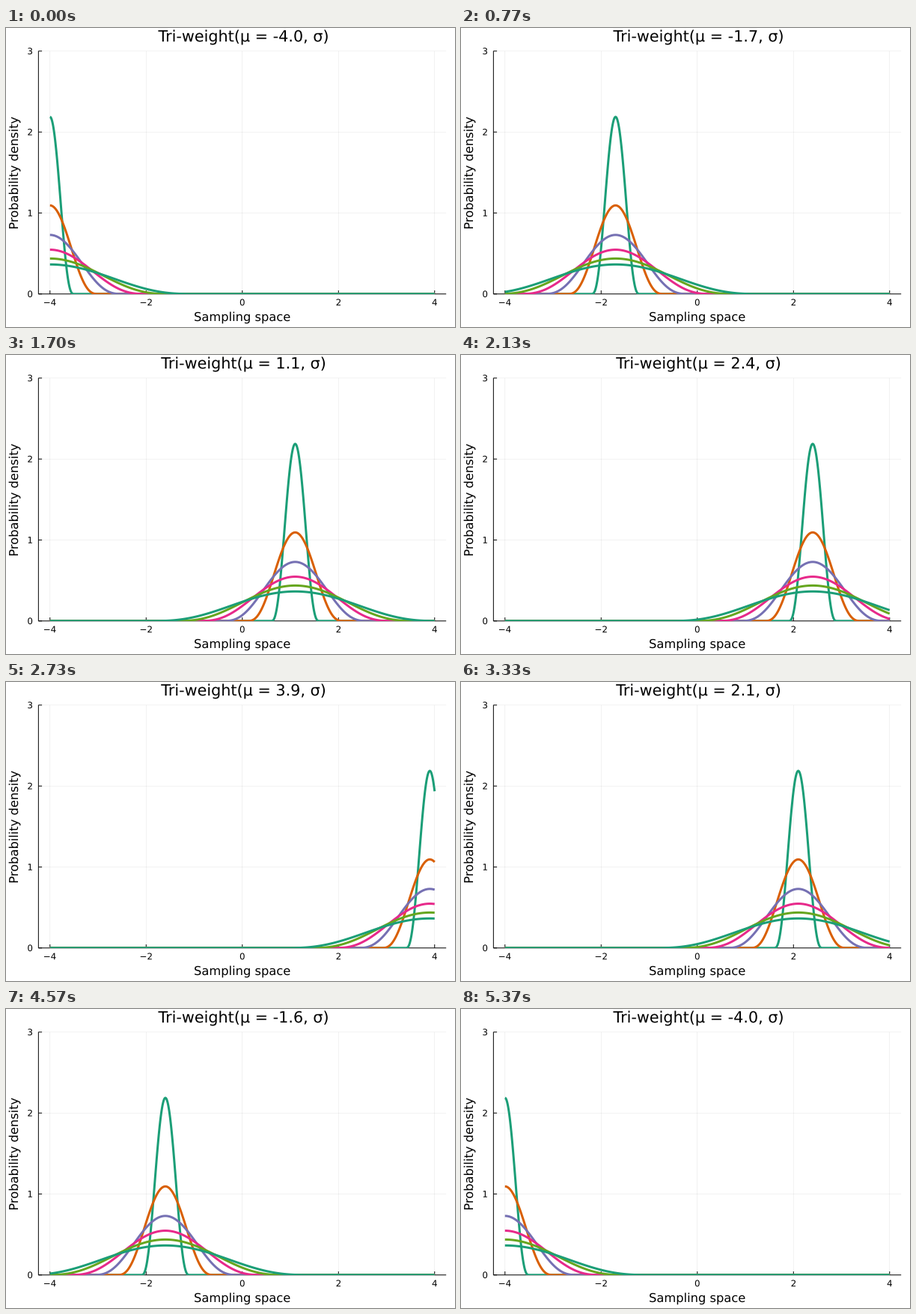
Recreate the animation shown at these times as a matplotlib script. Size 600 by 400 pixels, loop 5.41 s.

```python
import numpy as np
import matplotlib.pyplot as plt
from matplotlib.animation import FuncAnimation
from matplotlib.patches import PathPatch, Rectangle
from matplotlib.textpath import TextPath
from matplotlib.transforms import Affine2D

plt.rcParams.update({"font.family": "DejaVu Sans", "path.simplify": False})

W, H, DPI = 600, 400, 100
TICK_MS, LOOP_MS = 10, 5410
LEFT, RIGHT, TOP, BOTTOM = 43.35, 588.19, 30.87, 355.8
MID_X = (LEFT + RIGHT) / 2
TITLE, GUIDE, SMALL = (1.4815 * s for s in (14, 11, 8))
TICK_LEN = 4.72
TEAL, ORANGE, VIOLET, PINK, GREEN = (
    "#1b9e77", "#d95f02", "#7570b3", "#e7298a", "#66a61e")
SIGMAS = np.arange(1, 7) / 2
COLORS = [TEAL, ORANGE, VIOLET, PINK, GREEN, TEAL]

# Centre in tenths: up from -4 to 4, then back down
UP = list(range(-40, 41))
CENTRES = [c / 10 for c in UP + UP[::-1]]


def sx(x):
    return MID_X + (RIGHT - LEFT) / 8.48 * x


def sy(y):
    return BOTTOM - (BOTTOM - TOP) / 3 * y


def triweight(x, mu, sigma):
    u = (x - mu) / sigma
    return 35 / 32 / sigma * np.clip(1 - u * u, 0, None) ** 3


fig = plt.figure(figsize=(W / DPI, H / DPI), dpi=DPI, facecolor="white")
ax = fig.add_axes([0, 0, 1, 1])
ax.set(xlim=(0, W), ylim=(H, 0))
ax.axis("off")


def stroke(xs, ys, color="black", width=1.0, z=1, **kw):
    return ax.plot(xs, ys, color=color, lw=width * 72 / DPI, zorder=z,
                   solid_capstyle="butt", solid_joinstyle="round",
                   snap=False, **kw)[0]


def grid(xs, ys):
    stroke(xs, ys, width=0.5, z=0, alpha=0.1)


def text_path(text, size, x, y, centred=True, angle=0):
    """Outline of a text whose baseline starts or is centred at (x, y)."""
    path = TextPath((0, 0), text, size=size)
    box = path.get_extents()
    shift = (box.x0 + box.x1) / 2 if centred else 0
    place = Affine2D().translate(-shift, 0).scale(1, -1)
    return place.rotate_deg(-angle).translate(x, y).transform_path(path)


def label(*args, **kw):
    patch = PathPatch(text_path(*args, **kw), fc="black", lw=0, snap=False)
    return ax.add_patch(patch)


for v in (-4, -2, 0, 2, 4):
    grid([sx(v)] * 2, [TOP, BOTTOM])
    stroke([sx(v)] * 2, [BOTTOM, BOTTOM - TICK_LEN])
    label(str(v).replace("-", "\u2212"), SMALL, sx(v), 371.24)
for v in range(4):
    grid([LEFT, RIGHT], [sy(v)] * 2)
    stroke([LEFT, LEFT + TICK_LEN], [sy(v)] * 2)
    label(str(v), SMALL, 28.4, sy(v) + 4.32, centred=False)
stroke([LEFT] * 2, [TOP, BOTTOM])
stroke([LEFT, RIGHT], [BOTTOM] * 2)

label("Sampling space", GUIDE, MID_X, 392)
label("Probability density", GUIDE, 16, 193.6, angle=90)


def title_path(mu):
    return text_path(f"Tri-weight(μ = {mu:.1f}, σ)", TITLE, 316.6, 18.14)


title = ax.add_patch(PathPatch(title_path(0), fc="black", lw=0, snap=False))

xs = np.linspace(-4, 4, 801)
plot_area = Rectangle((LEFT, TOP), RIGHT - LEFT, BOTTOM - TOP,
                      transform=ax.transData)
curves = [stroke(sx(xs), sy(0 * xs), c, 3, z=2) for c in COLORS]
for curve in curves:
    curve.set_clip_path(plot_area)


def update(n):
    # 30 steps per second on a 10 ms clock
    step = min((6 * n + 3) // 20, len(CENTRES) - 1)
    mu = CENTRES[step]
    for curve, sigma in zip(curves, SIGMAS):
        curve.set_ydata(sy(triweight(xs, mu, sigma)))
    title.set_path(title_path(mu))
    return [*curves, title]


anim = FuncAnimation(fig, update, frames=LOOP_MS // TICK_MS,
                     interval=TICK_MS, repeat=True, repeat_delay=0)
plt.show()
```
